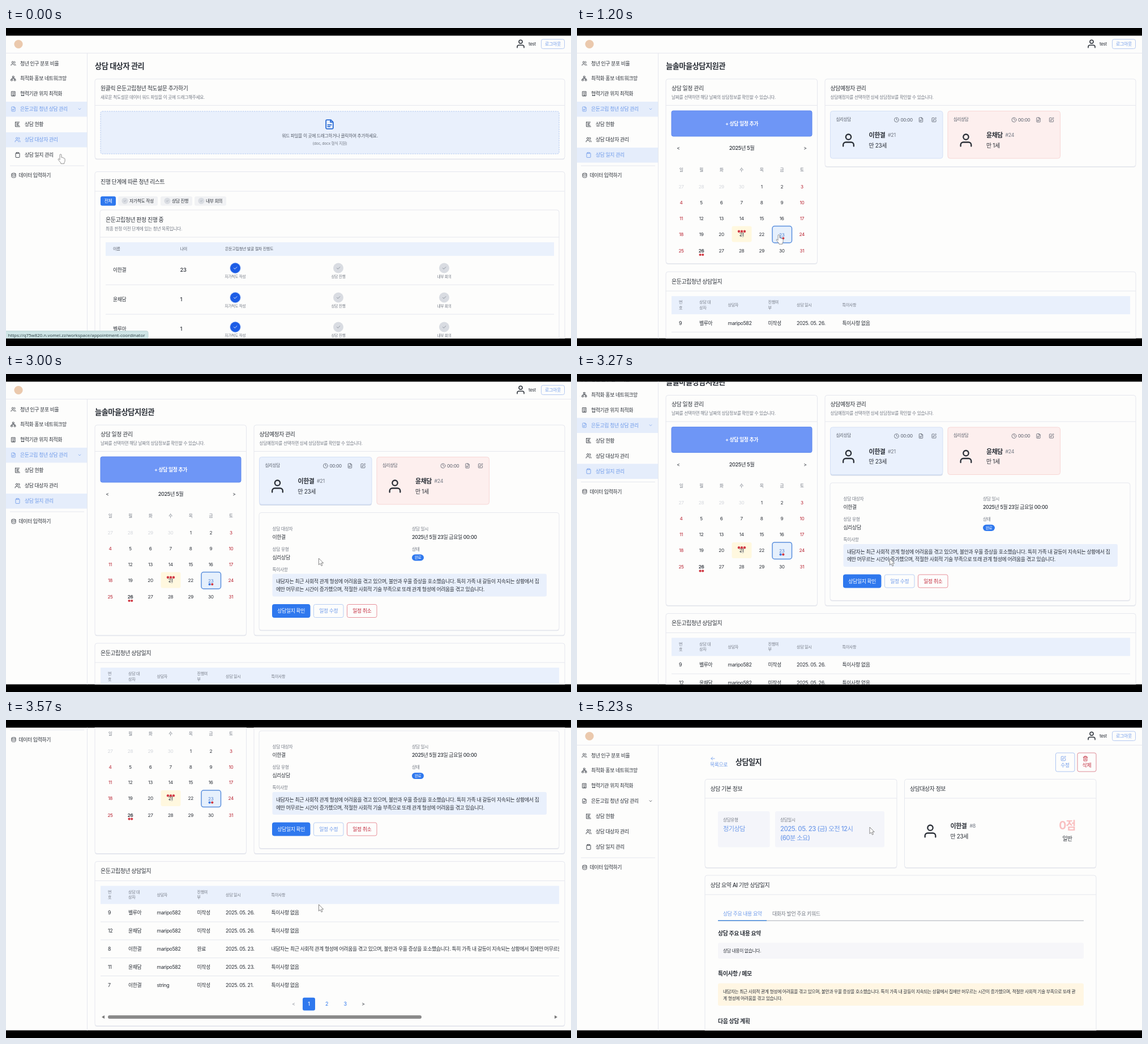
Animation, 998 px wide and 561 px high, one loop 5.26 s. Source, as an HTML page:

```html
<!DOCTYPE html>
<html lang="ko">
<head>
<meta charset="utf-8">
<title>상담 관리</title>
<style>
html, body { margin: 0; width: 100%; height: 100%; overflow: hidden; background: #000; }
svg { display: block; width: 100vw; height: 100vh; }
text { font-family: Inter, "Noto Sans CJK KR", "Noto Sans CJK", sans-serif; letter-spacing: -.04em; white-space: pre; }
#status text { font-family: "Noto Sans", sans-serif; letter-spacing: 0; }
</style>
</head>
<body>
<svg id="stage" viewBox="0 0 998 561" xmlns="http://www.w3.org/2000/svg"></svg>
<script>
const LOOP = 5260;
const INK = '#2b3038', GREY = '#747a85', BLUE = '#2f78ee', SKY = '#6f9bea', RED = '#c22a3c';
const LINE = '#e5e7ee', TINT = '#e9f0fc', PAPER = '#fdfdfc';
const ANA = '이한결', BEA = '윤채담', CLEO = '벨루아', STAFF = 'maripo582';
const MEMO = ['내담자는 최근 사회적 관계 형성에 어려움을 겪고 있으며, 불안과 우울 증상을 호소했습니다. 특히 가족 내 갈등이 지속되는 상황에서 집',
  '에만 머무르는 시간이 증가했으며, 적절한 사회적 기술 부족으로 또래 관', '계 형성에 어려움을 겪고 있습니다.'];

const ICONS = {
  user: 'M16 7a4 4 0 1 1-8 0a4 4 0 1 1 8 0M20 21v-2a4 4 0 0 0-4-4H8a4 4 0 0 0-4 4v2',
  users: 'M13 7a4 4 0 1 1-8 0a4 4 0 1 1 8 0M2 21v-2a4 4 0 0 1 4-4h6a4 4 0 0 1 4 4v2M16 3a4 4 0 0 1 0 8M22 21v-2a4 4 0 0 0-3-4',
  network: 'M9 2h6v6H9zM2 16h6v6H2zM16 16h6v6h-6zM5 16v-4h14v4M12 12V8',
  building: 'M4 2h16v20H4zM9 22v-4h6v4M8 6h2M14 6h2M8 10h2M14 10h2M8 14h2M14 14h2',
  file: 'M15 2H6a2 2 0 0 0-2 2v16a2 2 0 0 0 2 2h12a2 2 0 0 0 2-2V7ZM14 2v5h6M8 13h8M8 17h5',
  chart: 'M3 3v18h18M3 3h16M8 8h9M8 12h6M8 16h10',
  clipboard: 'M8 4H6a2 2 0 0 0-2 2v14a2 2 0 0 0 2 2h12a2 2 0 0 0 2-2V6a2 2 0 0 0-2-2h-2M8 2h8v4H8z',
  database: 'M3 5a9 3 0 0 1 18 0a9 3 0 0 1-18 0v14a9 3 0 0 0 18 0V5M3 12a9 3 0 0 0 18 0',
  edit: 'M12 3H5a2 2 0 0 0-2 2v14a2 2 0 0 0 2 2h14a2 2 0 0 0 2-2v-7M18.4 2.6a2 2 0 0 1 3 3L12 15l-4 1 1-4z',
  clock: 'M22 12a10 10 0 1 1-20 0a10 10 0 1 1 20 0M12 6v6l4 2',
  trash: 'M3 6h18M19 6v16H5V6M8 6V2h8v4M10 11v6M14 11v6',
  back: 'M20 12H4M11 5l-7 7 7 7',
  down: 'M6 9l6 6 6-6',
  check: 'M5 12l5 5L20 7'
};

const rect = (x, y, x2, y2, fill, stroke = 'none', r = 0, extra = '') =>
  `<rect x="${x}" y="${y}" width="${x2 - x}" height="${y2 - y}" rx="${r}" fill="${fill}" stroke="${stroke}" ${extra}/>`;
const line = (x, y, x2, y2 = y, color = LINE, w = 1) =>
  `<path d="M${x} ${y}L${x2} ${y2}" stroke="${color}" stroke-width="${w}"/>`;
const dot = (x, y, r, fill) => `<circle cx="${x}" cy="${y}" r="${r}" fill="${fill}"/>`;
// y is the optical middle of the line
const text = (x, y, s, size = 8.9, fill = INK, weight = 400, anchor = 'start', extra = '') =>
  `<text x="${x}" y="${y + size * .37}" font-size="${size}" fill="${fill}" font-weight="${weight}" text-anchor="${anchor}" ${extra}>${s.replace(/</g, '&lt;')}</text>`;
const mid = (x, y, s, size, fill, weight) => text(x, y, s, size, fill, weight, 'middle');
const icon = (name, x, y, size = 10, color = INK, w = 2) =>
  `<path d="${ICONS[name]}" transform="translate(${x - size / 2} ${y - size / 2}) scale(${size / 24})" fill="none" stroke="${color}" stroke-width="${w}" stroke-linecap="round" stroke-linejoin="round"/>`;
const panel = (x, y, x2, y2, head) =>
  rect(x, y + 1.3, x2, y2 + 1.3, '#e4e6ec', 'none', 4) + rect(x, y, x2, y2, PAPER, LINE, 4) + (head ? line(x, head, x2) : '');
const button = (x, y, x2, y2, label, fill, stroke, color, size = 8.9, weight = 500) =>
  rect(x, y, x2, y2, fill, stroke, 3) + mid((x + x2) / 2, (y + y2) / 2, label, size, color, weight);
const badge = (x, y, r, on) =>
  dot(x, y, r, on ? '#1d5de6' : '#d9dce2') + icon('check', x, y, r * .95, on ? '#fff' : '#7f8792', 2.4);

function frame(active) {
  const open = active >= 0;
  const items = [
    ['users', 13, 25, 62.5, '청년 인구 분포 비율'], ['network', 13, 25, 89, '최적화 홍보 네트워크망'],
    ['building', 13, 25, 116, '협력기관 위치 최적화'], ['file', 13, 25, 143, '은둔고립 청년 상담 관리'],
    ['chart', 20.5, 33, 170, '상담 현황'], ['users', 20.5, 33, 197, '상담 대상자 관리'],
    ['clipboard', 20.5, 33, 224, '상담 일지 관리'], ['database', 13.5, 22.5, 260, '데이터 입력하기']];
  let s = line(0, 44.3, 998) + line(143.5, 44, 143.5, 800) + line(7, 243, 138)
    + dot(22, 28.5, 7.6, '#ebc9ad')
    + icon('user', 909, 28, 18, INK) + text(923, 28.5, 'test', 8)
    + button(945.5, 20, 986.5, 36.5, '로그아웃', PAPER, '#b4c9f1', SKY, 8);
  items.forEach(([name, ix, tx, y, label], i) => {
    const lit = open && (i === 3 || i === active);
    if (lit) s += rect(0, y - 13, 143, y + 13.5, '#e5edfb');
    s += icon(name, ix, y, i > 3 && i < 7 ? 10.5 : 9.5, lit ? SKY : INK) + text(tx, y, label, 8.85, lit ? SKY : INK, 500);
  });
  return s + icon('down', 130, 143, 8, open ? SKY : INK);
}

function clientsPage() {
  const steps = [[405, '자가척도 작성'], [587, '상담 진행'], [774, '내부 회의']];
  let s = frame(5) + text(157, 67, '상담 대상자 관리', 13.25, INK, 600)
    + panel(157, 90, 987, 231, 136.5)
    + text(167, 106, '원클릭 은둔고립청년 척도설문 추가하기', 9.9, INK, 500)
    + text(167, 122, '새로운 척도설문 데이터 워드 파일을 이 곳에 드래그해주세요.', 7.7, GREY)
    + rect(167, 147, 977, 222, TINT, '#b3c9f0', 3, 'stroke-dasharray="2.5 1.5"')
    + icon('file', 571.5, 170, 19, '#2b6cd4', 2.3)
    + mid(572, 190.5, '워드 파일을 이 곳에 드래그하거나 클릭하여 추가하세요.', 7.75, '#555c68', 500)
    + mid(572, 203, '(doc, docx 형식 지원)', 6.8, GREY)
    + panel(157, 253.5, 987, 640, 288)
    + text(167, 271, '진행 단계에 따른 청년 리스트', 9.9, INK, 500)
    + button(167, 297, 194, 313.5, '전체', BLUE, 'none', '#fff', 7.8);
  [[198, 268], [273, 329], [333, 389]].forEach(([x, x2], i) => {
    s += rect(x, 297, x2, 313.5, '#f1f2f4', 'none', 3) + badge(x + 12, 305, 5.6, false)
      + text(x + 20, 305, steps[i][1], 7.8, INK, 500);
  });
  s += rect(166, 321, 977, 640, PAPER, LINE, 4) + line(166, 369, 977)
    + text(176, 338.5, '은둔고립청년 판정 진행 중', 9.9, INK, 500)
    + text(176, 354, '최종 판정 이전 단계에 있는 청년 목록입니다.', 7.7, GREY)
    + rect(176, 378, 968, 402, '#eaf1fc')
    + text(189, 389.5, '이름', 7, '#555c68') + text(307.5, 389.5, '나이', 7, '#555c68')
    + text(387, 389.5, '은둔고립청년 발굴 절차 진행도', 7, '#555c68');
  [[ANA, '23'], [BEA, '1'], [CLEO, '1']].forEach(([name, age], i) => {
    const y = 427 + i * 52;
    s += text(189, y, name, 8.9, INK, 500) + text(307.5, y, age, 9.4, INK, 500) + line(176, y + 26, 968);
    steps.forEach(([x, label], k) => {
      s += (k ? '' : dot(x, y - 3.5, 10, '#cfdefa')) + badge(x, y - 3.5, 9, !k) + mid(x, y + 12, label, 6.7, GREY);
    });
  });
  return s;
}

function calendar(picked) {
  const colX = i => 184 + 35.55 * i, rowY = [280, 308, 335.5, 363.5, 393];
  let s = button(167, 146, 415, 191, '+ 상담 일정 추가', '#6e96f6', '#5f89ee', '#fff', 8.9, 600)
    + mid(179, 212, '<', 8.5) + mid(291, 212, '2025년 5월', 9.2, INK, 500) + mid(403, 212, '>', 8.5)
    + [...'일월화수목금토'].map((d, i) => mid(colX(i), 250, d, 7.6, GREY)).join('')
    + rect(273.5, 349.5, 308.5, 377.5, '#fff8df', 'none', 3)
    + (picked ? rect(345, 349.5, 379.5, 379, '#e6f0fc', '#5a8fdd', 4, 'stroke-width="1.5"') : '');
  for (let n = 0; n < 35; n++) {
    const col = n % 7, day = n - 3, past = day < 1, on = picked && day === 23;
    const color = past ? '#d3d6dc' : on ? '#4e80d0' : col % 6 ? INK : '#b8202f';
    s += mid(colX(col), rowY[n / 7 | 0] + (on ? 1 : 0), String(past ? day + 30 : day), 8.2, color, day === 26 ? 600 : 400);
  }
  const mark = '#d13a45';
  [286, 291, 296].forEach(x => s += dot(x, 358.8, 2.2, mark));
  return s + mid(291, 366.5, '+5', 6, GREY) + dot(217.6, 400, 2.1, mark) + dot(222.2, 400, 2.1, mark)
    + dot(359.6, 371, 2.1, '#3f7be0') + dot(364.3, 371, 2.1, mark);
}

function visitCard(x, name, id, age, fill, edge, lifted) {
  return (lifted ? rect(x, 148, x + 198.5, 232, '#d3dbea', 'none', 4) : '')
    + rect(x, 146.5, x + 198.5, 230, fill, edge, 4)
    + text(x + 10, 161, '심리상담', 7.5, '#555c68', 500)
    + icon('clock', x + 117, 162, 9.5, '#555c68') + text(x + 124, 162, '00:00', 8.2, '#555c68')
    + icon('file', x + 160, 162, 9.5, '#555c68') + icon('edit', x + 183, 162, 9.5, '#555c68')
    + icon('user', x + 32, 198, 28, INK)
    + text(x + 68, 189, name, 11, INK, 600) + text(x + 101.5, 189, id, 9, GREY) + text(x + 68, 207, age, 10);
}

function visitDetail() {
  return panel(447, 244.5, 977, 452)
    + text(470.5, 273, '상담 대상자', 7.7, GREY) + text(470.5, 287.5, ANA, 8.9, INK, 500)
    + text(717, 273, '상담 일시', 7.7, GREY) + text(717, 287.5, '2025년 5월 23일 금요일 00:00', 8.9, INK, 500)
    + text(470.5, 309, '상담 유형', 7.7, GREY) + text(470.5, 323.5, '심리상담', 8.9, INK, 500)
    + text(717, 309, '상태', 7.7, GREY)
    + rect(717, 318.3, 738, 329.5, BLUE, 'none', 5.6) + mid(727.5, 324, '완료', 6.6, '#fff')
    + text(470.5, 345, '특이사항', 7.7, GREY)
    + rect(470.5, 352.5, 955, 392.5, TINT, 'none', 3)
    + text(477, 366, MEMO[0]) + text(477, 379.7, MEMO[1] + MEMO[2])
    + button(470.5, 406.5, 537, 429.5, '상담일지 확인', BLUE, BLUE, '#fff')
    + `<g id="edit">${button(543.5, 406.5, 596, 429.5, '일정 수정', PAPER, '#b9cff4', SKY)}</g>`
    + button(602.5, 406.5, 655, 429.5, '일정 취소', PAPER, '#e8919b', RED);
}

function journal(y) {
  const cols = [180, 216, 266.5, 337.5, 388, 468.5];
  const heads = [['번', '호'], ['상담 대', '상자'], ['상담자'], ['진행여', '부'], ['상담 일시'], ['특이사항']];
  const none = '특이사항 없음', todo = '미작성';
  const rows = [
    ['9', CLEO, STAFF, todo, '2025. 05. 26.', none], ['12', BEA, STAFF, todo, '2025. 05. 26.', none],
    ['8', ANA, STAFF, '완료', '2025. 05. 23.', MEMO[0] + MEMO[1]], ['11', BEA, STAFF, todo, '2025. 05. 23.', none],
    ['7', ANA, 'string', todo, '2025. 05. 21.', none]];
  let s = panel(157, y, 987, y + 290, y + 34) + text(167, y + 17, '은둔고립청년 상담일지', 9.9, INK, 500)
    + rect(167, y + 43, 977, y + 75, TINT);
  heads.forEach((parts, i) => parts.forEach((part, k) => {
    s += text(cols[i], y + 58.5 + (k - (parts.length - 1) / 2) * 9.5, part, 7, GREY);
  }));
  rows.forEach((row, r) => {
    const cy = y + 90.5 + r * 31.8;
    row.forEach((cell, i) => s += text(cols[i], cy, cell, 8.9, INK, 400, 'start', 'clip-path="url(#table)"'));
    if (r < 4) s += line(167, cy + 16, 977);
  });
  const py = y + 251.5, sy = y + 274.5;
  return s + mid(508, py, '<', 8.5, '#8b919b') + button(524, py - 11.3, 546, py + 11.3, '1', BLUE, 'none', '#fff', 9)
    + mid(566.5, py, '2', 9, BLUE) + mid(599, py, '3', 9, BLUE) + mid(631, py, '>', 8.5)
    + rect(180, sy - 3, 734, sy + 3, '#8a8a8a', 'none', 3)
    + `<path d="M169 ${sy}l5-3v6zM974 ${sy}l-5-3v6z" fill="#777"/>`;
}

function schedulePage(picked, open) {
  const end = open ? 461 : 415.5;
  return frame(6) + text(157, 67, '늘솔마을상담지원관', 13.25, INK, 600)
    + panel(157, 90, 424.5, end, 136.5) + text(167, 106, '상담 일정 관리', 9.9, INK, 500)
    + text(167, 122, '날짜를 선택하면 해당 날짜의 상담정보를 확인할 수 있습니다.', 7.7, GREY) + calendar(picked)
    + panel(438, 90, 987, open ? 461 : 244.5, 136.5) + text(447.5, 106, '상담예정자 관리', 9.9, INK, 500)
    + text(447.5, 122, '상담예정자를 선택하면 상세 상담정보를 확인할 수 있습니다.', 7.7, GREY)
    + visitCard(447.5, ANA, '#21', '만 23세', '#eaf1fd', '#d3dff5', open)
    + visitCard(655, BEA, '#24', '만 1세', '#fdefee', '#f7d6d5', false)
    + (open ? visitDetail() : '') + journal(open ? 475 : 430);
}

function reportPage() {
  const soft = '#f4f5fa';
  return frame(-1) + icon('back', 240, 68, 9.5, SKY) + text(235, 79, '목록으로', 8.8, SKY, 500)
    + text(280, 74.5, '상담일지', 13.1, INK, 600)
    + rect(845.5, 58, 879, 91, PAPER, '#adc5f2', 3) + icon('edit', 859, 68, 10, SKY) + mid(862, 79.5, '수정', 8.8, SKY, 500)
    + rect(884, 58, 917, 91, PAPER, '#dd8b96', 3) + icon('trash', 898, 68, 10, RED) + mid(900.5, 79.5, '삭제', 8.8, RED, 500)
    + panel(226, 104.5, 565, 260.5, 138) + text(235.5, 121.5, '상담 기본 정보', 9.9, INK, 500)
    + rect(249, 161, 340.5, 224.5, soft, 'none', 3) + text(258, 176, '상담유형', 7.6, GREY)
    + text(258, 191.5, '정기상담', 11.1, SKY, 500)
    + rect(350, 161, 543, 224.5, soft, 'none', 3) + text(359, 176, '상담일시', 7.6, GREY)
    + text(359, 191.5, '2025. 05. 23 (금) 오전 12시', 11.3, SKY, 500) + text(359, 207.5, '(60분 소요)', 11.1, SKY, 500)
    + panel(578.5, 104.5, 917, 260.5, 138) + text(588, 121.5, '상담대상자 정보', 9.9, INK, 500)
    + icon('user', 624, 196, 28, INK) + text(659.5, 187, ANA, 11, INK, 600) + text(693.5, 187, '#8', 9, GREY)
    + text(659.5, 205, '만 23세', 10)
    + mid(866, 186, '0점', 19.5, '#f9bfc0', 700) + mid(866, 209.5, '일반', 9.8)
    + panel(226, 274, 917, 640, 308) + text(235.5, 291, '상담 요약 AI 기반 상담일지', 9.9, INK, 500)
    + text(258, 342, '상담 주요 내용 요약', 8.9, SKY, 500) + text(345, 342, '대화자 발언 주요 키워드', 8.9, GREY)
    + line(249, 354, 895, 354, '#a7adb5') + line(249, 353.7, 335, 353.7, '#4d8fe0', 1.6)
    + text(249, 376, '상담 주요 내용 요약', 9.9, INK, 600)
    + rect(249, 393, 895, 421, '#f6f6f9', 'none', 3) + text(258, 407.3, '상담 내용이 없습니다.', 7.75)
    + text(249, 447.5, '특이사항 / 메모', 9.9, INK, 600)
    + rect(249, 464.5, 895, 504, '#fff6e3', 'none', 3)
    + text(258, 479, MEMO[0] + MEMO[1], 7.75) + text(258, 490.7, MEMO[2], 7.75)
    + text(249, 531, '다음 상담 계획', 9.9, INK, 600);
}

const views = [
  { from: 0, body: clientsPage() }, { from: 270, body: schedulePage(false, false) },
  { from: 960, body: schedulePage(true, false) }, { from: 2200, body: schedulePage(true, true) },
  { from: 4890, body: reportPage() }];

const stage = document.getElementById('stage');
stage.innerHTML = `<defs><clipPath id="screen"><rect y="13.4" width="998" height="534.2"/></clipPath>
  <clipPath id="table"><rect x="167" y="0" width="810" height="900"/></clipPath></defs>
  <rect width="998" height="561"/>
  <g clip-path="url(#screen)">${rect(0, 13, 998, 548, PAPER)}
    ${views.map(v => `<g class="view">${v.body}</g>`).join('')}
    <g id="status">${rect(-4, 534.5, 251, 552, '#cfe5e6', '#bfd6d8', 3)}
      ${text(3.5, 542, 'https://q75w820.n.vomel.zz/workspace/appointment-coordinator', 7.9, '#33454a')}</g>
    <g id="cursor" stroke="#777" stroke-width=".9" stroke-linejoin="round" fill="#fff">
      <path id="hand" transform="scale(.88)" d="M-1.6 9V1.2a1.6 1.6 0 0 1 3.2 0V6q2.6-.8 2.8.9q2.2-.5 2.4 1q1.8-.2 1.8 1.5V13q0 2-1.4 3.6V18.5H.4V17L-4.6 11q-1-1.8.4-2.2q1.2-.2 2.6 2z"/>
      <path id="arrow" d="M0 0V11.6L2.7 9.2L4.6 13.4L6.5 12.5L4.6 8.4H8.2Z"/></g></g>`;

const find = id => document.getElementById(id);
const groups = [...document.querySelectorAll('.view')];
const editBox = find('edit').querySelector('rect');
const show = (el, on) => el.setAttribute('display', on ? 'inline' : 'none');
const between = (t, a, b) => t >= a && t < b;
const ease = (t, a, b) => { const x = Math.min(1, Math.max(0, (t - a) / (b - a))); return x * x * (3 - 2 * x); };

// start, end, target x, target y
const moves = [[380, 940, 356.5, 365], [1550, 2080, 534, 206], [2480, 3020, 552.5, 325.5],
  [4120, 4490, 539, 179], [4510, 4680, 517, 189]];
const handTimes = [[0, 420], [840, 1640], [1960, 2560], [4560, 4900]];

function render(t) {
  const current = views.filter(v => t >= v.from).length - 1;
  groups.forEach((g, i) => show(g, i === current));
  groups[3].setAttribute('transform', `translate(0 ${(-228.8 * ease(t, 3120, 3606)).toFixed(2)})`);
  let x = 96.5, y = 223;
  for (const [a, b, tx, ty] of moves) {
    const k = ease(t, a, b);
    x += (tx - x) * k;
    y += (ty - y) * k;
  }
  find('cursor').setAttribute('transform', `translate(${x.toFixed(2)} ${y.toFixed(2)})`);
  const pointing = handTimes.some(([a, b]) => between(t, a, b));
  show(find('hand'), pointing);
  show(find('arrow'), !pointing);
  show(find('status'), t < 420);
  editBox.setAttribute('fill', between(t, 4420, 4560) ? '#dfe9fb' : PAPER);
}

const begin = performance.now();
function tick() {
  render((performance.now() - begin) % LOOP);
  requestAnimationFrame(tick);
}
tick();
</script>
</body>
</html>
```
